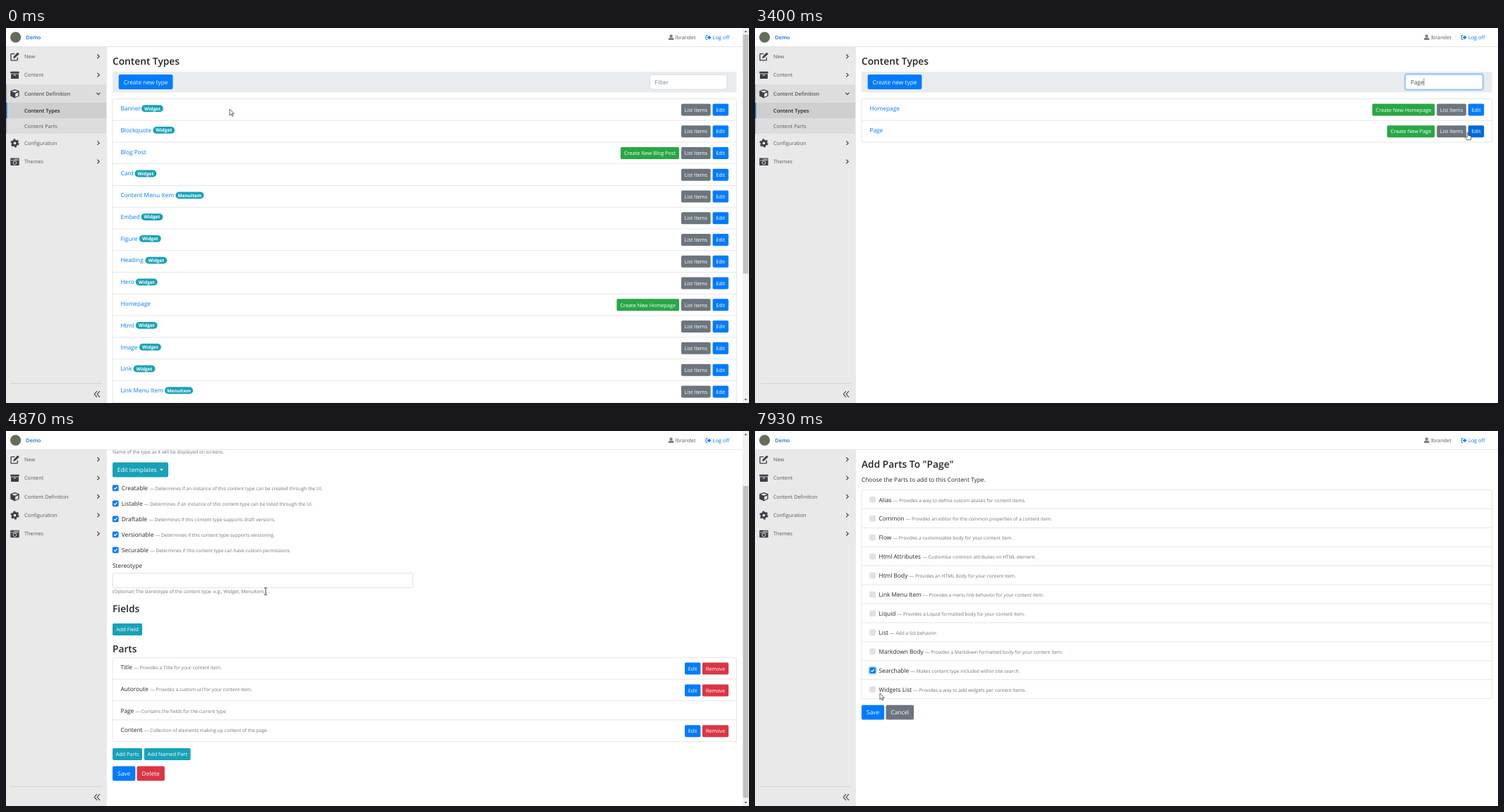
An HTML page that plays this animation: 1053 by 532 pixels, repeating every 8000 ms.

```html
<!DOCTYPE html>
<html lang="en">
<head>
<meta charset="utf-8">
<title>Content Types</title>
<style>
html, body { margin: 0; width: 100%; height: 100%; overflow: hidden; background: #fff; }
svg { display: block; width: 100vw; height: 100vh; }
text { font: 8.34px 'Open Sans', 'Noto Sans', sans-serif; fill: #212529; text-rendering: geometricPrecision; white-space: pre; }
.h { font-size: 13.75px; font-weight: 600; }
.s { font-size: 6.67px; fill: #6c757d; }
.m { font-size: 7.32px; fill: #555b61; }
.sm { font-size: 7.3px; }
.b { font-weight: 600; }
.badge { font-size: 6.5px; font-weight: 700; }
.url { font-size: 6.27px; fill: #5f6368; }
.link { fill: #007bff; }
.w { fill: #fff; text-anchor: middle; }
</style>
</head>
<body>
<svg id="stage" viewBox="0 0 1053 532"></svg>
<script>
const STEP = 200 / 3, LOOP = 8000, SHIFT = 9.3, SCROLL = 81.8;
const BLUE = '#007bff', GREY = '#6c757d', GREEN = '#28a745', TEAL = '#17a2b8', RED = '#dc3545';
const SIDE = '#e9e9e9', INK = '#3a4047';
const SITE = 'https://localhost:44358/demo/OrchardCore.ContentTypes/Admin/';

// name, badge x (0 = none), width of the create button (0 = none)
const TYPES = [
  ['Banner', 192], ['Blockquote', 208.3], ['Blog Post', 0, 83], ['Card', 182.5],
  ['Content Menu Item', 240.4], ['Embed', 191.5], ['Figure', 188.9], ['Heading', 197.4],
  ['Hero', 183.8], ['Homepage', 0, 88.5], ['Html', 183.8], ['Image', 189], ['Link', 180.6],
  ['Link Menu Item', 225], ['Page', 0, 67.5], ['Paragraph', 205.5, 0]
];
const OPTIONS = [
  ['Creatable', 'Determines if an instance of this content type can be created through the UI.'],
  ['Listable', 'Determines if an instance of this content type can be listed through the UI.'],
  ['Draftable', 'Determines if this content type supports draft versions.'],
  ['Versionable', 'Determines if this content type supports versioning.'],
  ['Securable', 'Determines if this content type can have custom permissions.']
];
const PARTS = [
  ['Title', 'Provides a Title for your content item.', 30.5],
  ['Autoroute', 'Provides a custom url for your content item.', 30.7],
  ['Page', 'Contains the fields for the current type', 27],
  ['Content', 'Collection of elements making up content of the page.', 30.7]
];
const CHOICES = [
  ['Alias', 'Provides a way to define custom aliases for content items.'],
  ['Common', 'Provides an editor for the common properties of a content item.'],
  ['Flow', 'Provides a customizable body for your content item.'],
  ['Html Attributes', 'Customise common attributes on HTML element.'],
  ['Html Body', 'Provides an HTML Body for your content item.'],
  ['Link Menu Item', 'Provides a menu link behavior for your content item.'],
  ['Liquid', 'Provides a Liquid formatted body for your content item.'],
  ['List', 'Add a list behavior.'],
  ['Markdown Body', 'Provides a Markdown formatted body for your content item.'],
  ['Searchable', 'Makes content type included within site search.'],
  ['Widgets List', 'Provides a way to add widgets per content items.']
];

// step, x, y, pointer shape from that step on
const PATH = [
  [0, 317, 115, 'arrow'], [1, 430, 150, 'arrow'], [2, 567, 180, 'arrow'], [4, 567, 180, 'arrow'],
  [6, 610, 170, 'arrow'], [9, 800, 122, 'arrow'], [13, 1014, 84, 'beam'], [16, 978, 77, 'beam'],
  [40, 978, 77, 'beam'], [42, 962, 90, 'arrow'], [45, 955, 115, 'arrow'], [49, 1000, 147, 'hand'],
  [52, 1015, 149, 'hand'], [57, 1015, 149, 'hand'], [58, 1000, 150, 'arrow'], [61, 640, 196, 'arrow'],
  [64, 368, 227.5, 'beam'], [73, 368, 227.5, 'beam'], [75, 345, 265, 'arrow'], [79, 240, 390, 'arrow'],
  [84, 174, 458, 'hand'], [93, 173, 457, 'arrow'], [94, 176, 450, 'arrow'], [97, 282, 257, 'beam'],
  [99, 296, 165, 'arrow'], [101, 290, 155, 'arrow'], [107, 163, 270, 'arrow'], [113, 166, 338, 'arrow'],
  [116, 166, 338, 'arrow'], [117, 166, 338, 'arrow'], [119, 177, 372, 'arrow']
];
const POINTERS = {
  arrow: '<path d="M0 0V8.9L2.1 7 3.5 10.2 4.9 9.6 3.5 6.5H6.2Z" fill="#fff" stroke="#222" stroke-width=".7"/>',
  beam: '<path d="M-2-4.8H-.6L0-4.3.6-4.8H2M0-4.3V4.3M-2 4.8H-.6L0 4.3.6 4.8H2" fill="none" stroke="#222" stroke-width=".9"/>',
  hand: '<path d="M-.8 0Q0-.9.8 0V4L4.4 4.9Q5.2 5.2 5 6.2L4.2 10.4H-1.2L-3.6 6.6Q-3.4 5.3-2.2 5.8L-.8 7Z" fill="#fff" stroke="#222" stroke-width=".7"/>'
};

const text = (x, y, str, cls = '', extra = '') => `<text x="${x}" y="${y}" class="${cls}" ${extra}>${str}</text>`;
const rect = (x, y, w, h, fill, r = 0, stroke = 'none', sw = .7) =>
  `<rect x="${x}" y="${y}" width="${w}" height="${h}" rx="${r}" fill="${fill}" stroke="${stroke}" stroke-width="${sw}"/>`;
const path = (d, fill, stroke = 'none', sw = 1) => `<path d="${d}" fill="${fill}" stroke="${stroke}" stroke-width="${sw}"/>`;
const move = (x, y, body) => `<g transform="translate(${x} ${y})">${body}</g>`;
const button = (x, cy, w, label, fill) =>
  rect(x, cy - 8.5, w, 17, fill, 1.8) + text(x + w / 2, cy + 2.7, label, 'sm w');
const bigButton = (x, y, w, label, fill) =>
  rect(x, y, w, 20.8, fill, 2.2) + text(x + w / 2, y + 13.5, label, 'w');
const described = (x, y, [name, info]) => text(x, y, `${name} <tspan class="s">— ${info}</tspan>`);
const input = (x, y, w, stroke = '#ced4da') => rect(x, y, w, 20.6, '#fff', 2.2, stroke);
const tick = (x, cy, on) => rect(x, cy - 4.4, 8.8, 8.8, on ? BLUE : '#dee2e6', 2) +
  (on ? path(`M${x + 2.2} ${cy + .1}L${x + 3.8} ${cy + 1.7} ${x + 6.7} ${cy - 1.6}`, 'none', '#fff', 1.2) : '');

function list(y, w, heights) {
  const total = heights.reduce((a, b) => a + b, 0);
  let at = y;
  const lines = heights.slice(0, -1).map(h => `M151 ${at += h}h${w}`).join('');
  return rect(151, y, w, total, '#fff', 2.2, '#dcdcdc') + path(lines, 'none', '#dcdcdc', .7);
}

const ICONS = {
  New: path('M10 7.5V11Q10 11.6 9.4 11.6H1.3Q.7 11.6.7 11V3Q.7 2.4 1.3 2.4H6', 'none', INK, 1.3) +
    path('M4 8.6L4.3 6.4 9.8.8Q10.3.4 10.8.8L12 1.9Q12.4 2.4 12 2.9L6.3 8.3Z', INK),
  Content: rect(0, 1.2, 12.4, 2.7, INK, .5) + rect(.7, 4.6, 11, 6.7, INK, .6) + rect(4.4, 5.7, 3.6, 1, SIDE),
  'Content Definition': path('M6.2 0L12.4 2.3V9.6L6.2 12.5 0 9.6V2.3Z', INK) +
    path('M6.2 1.5L10.5 3.1 6.2 4.8 1.9 3.1ZM6.9 6.2L11 4.5V8.9L6.9 10.9Z', SIDE),
  Configuration: `<g fill="none" stroke="${INK}"><circle cx="6.2" cy="6.2" r="3.3" stroke-width="2.8"/>
    <circle cx="6.2" cy="6.2" r="5.1" stroke-width="2" stroke-dasharray="2.8 2.54"/></g>`,
  Themes: rect(0, 1, 12.4, 10.6, INK, 1) + path('M5 2.6H11.4M.9 4.2H11.5', 'none', SIDE, .8) +
    `<circle cx="6.2" cy="7.7" r="2.4" fill="none" stroke="${SIDE}" stroke-width=".9"/>`
};

function sidebar(open) {
  let out = rect(0, 27, 142.4, 505, SIDE) + path('M142.4 27V532', 'none', '#dedede', .6);
  if (open) {
    out += rect(0, 80, 142, 70, '#dddddd') + rect(0, 106, 142, 22, '#cfcfcf') +
      rect(0, 80, 1.3, 70, '#b4b4b4') + rect(0, 106, 1.5, 22, '#0b78d0') +
      text(26, 119.7, 'Content Types', 'm b', 'style="fill:#212529"') + text(26, 141.7, 'Content Parts', 'm');
  }
  Object.keys(ICONS).forEach((name, i) => {
    const y = 40.3 + 26.35 * i + (open && i > 2 ? 43.8 : 0), down = open && i === 2;
    out += move(6.3, y - 6, ICONS[name]) + text(26, y + 2.5, name, down ? 'm b' : 'm') +
      path(down ? `M128.3 ${y - 1.2}l2.6 2.6 2.6-2.6` : `M129.4 ${y - 2.8}l2.8 2.8-2.8 2.8`, 'none', INK, 1.2);
  });
  return out + path('M6 504.5H136', 'none', '#cfcfcf', .8) +
    path('M129 515.2l-3.7 4.3 3.7 4.3M133 515.2l-3.7 4.3 3.7 4.3', 'none', INK, 1.1);
}

function header(dx) {
  const user = '<circle cx="942.6" cy="11.3" r="2.1" fill="#7b7f84"/>' + path('M938.9 17V15.8Q939 13.6 941 13.6H944.2Q946.2 13.6 946.3 15.8V17Z', '#7b7f84');
  const exit = path('M994.5 10.4H992.6Q992 10.4 992 11V15.7Q992 16.3 992.6 16.3H994.5', 'none', BLUE, 1) +
    path('M994 12.2H996V10.2L999.3 13.4 996 16.6V14.6H994Z', BLUE);
  return rect(0, 0, 1053, 26.5, '#fff') + path('M0 26.5H1053', 'none', '#dfdfdf', .8) +
    '<circle cx="13.6" cy="13.1" r="7.6" fill="#646c5c"/>' +
    text(28.3, 16, 'Demo', 'm b', 'style="fill:#0b74d1"') +
    move(dx, 0, user + text(948.6, 16.4, 'lbrandet', 'm') + exit + text(1001.6, 16.4, 'Log off', 'm', 'style="fill:#007bff"'));
}

const scrollbar = (y, h) => rect(1043.7, 0, 9.3, 532, '#f1f1f1') + rect(1044.6, y, 7.6, h, '#c1c1c1') +
  path('M1046.3 6L1048.4 3.4 1050.5 6ZM1046.3 526L1048.4 528.6 1050.5 526Z', '#666');

function typesPage(n) {
  const word = n < 25 ? '' : n < 28 ? 'P' : n < 31 ? 'Pa' : n < 33 ? 'Pag' : 'Page';
  const query = n < 26 ? '' : n < 29 ? 'p' : n < 32 ? 'pa' : 'pag';
  const rows = TYPES.filter(([name]) => name.toLowerCase().includes(query));
  const dx = query ? SHIFT : 0, width = 884.4 + dx, pitch = 30.77;
  const glow = n < 18 || n > 54 ? 0 : n === 18 ? .5 : 1;
  const caretX = 919.8 + [0, 5, 9.7, 14.2, 18.9][word.length];
  let out = text(151, 51.8, 'Content Types', 'h') + rect(151, 62, width, 29.3, '#e9ecef') +
    bigButton(159.7, 66.1, 76.7, 'Create new type', BLUE);
  out += move(dx, 0,
    (glow ? rect(911.6, 65.2, 111.2, 22.6, 'none', 3, `rgba(0,123,255,${.27 * glow})`, 2.2) : '') +
    input(912.6, 66.3, 109.3, glow ? '#80bdff' : '#ced4da') +
    text(919.6, 80, word || 'Filter', '', `style="fill:${word ? '#495057' : '#7a828a'}"`) +
    (n >= 17 && n < 54 ? path(`M${caretX} 71.5V82`, 'none', '#333', .6) : ''));
  out += list(100.4, width, rows.map(() => pitch));
  rows.forEach(([name, pill, create], i) => {
    const y = 114.2 + pitch * i, label = name.includes('Menu Item') ? 'MenuItem' : 'Widget';
    const pillW = label === 'Widget' ? 30.8 : 40;
    const hot = name === 'Page' && n > 50;
    out += text(162.4, y + 2.9, name, 'link');
    if (pill) out += rect(pill, y - 4.9, pillW, 9.8, TEAL, 4.9) + text(pill + pillW / 2, y + 2.4, label, 'badge w');
    out += move(dx, 0, (create ? button(954 - create, y + 1.7, create, 'Create New ' + name, GREEN) : '') +
      button(957, y + 1.7, 41.6, 'List Items', GREY) +
      (hot && n > 54 ? rect(1000.6, y - 7.8, 24.2, 19, 'none', 2.6, 'rgba(0,123,255,.45)', 2) : '') +
      button(1001.5, y + 1.7, 22.4, 'Edit', hot ? '#0069d9' : BLUE));
  });
  return out + sidebar(true) + header(dx) + (dx ? '' : scrollbar(9.4, 339));
}

function editPage(n) {
  const p = Math.min(1, Math.max(0, (n - 68) / 5)), top = SCROLL * p * p * (3 - 2 * p);
  let out = text(151, 51.8, 'Edit Content Type - Page', 'h') + text(151, 75.6, 'Display Name') +
    input(151.2, 83.8, 220.3) + text(158, 97.7, 'Page', '', 'style="fill:#495057"') +
    text(151, 114, 'Name of the type as it will be displayed on screens.', 's') +
    rect(151, 126.4, 79, 20.8, TEAL, 2.2) + text(157.8, 139.9, 'Edit templates', '', 'style="fill:#fff"') +
    path('M217.8 135.6h5.2l-2.6 2.7Z', '#fff');
  OPTIONS.forEach((option, i) => {
    const y = 162.6 + 22 * i;
    out += tick(150.8, y, true) + described(163.8, y + 3.2, option);
  });
  out += text(151, 275.6, 'Stereotype') + input(151.2, 283.5, 425.4) +
    text(151, 312.3, '(Optional) The stereotype of the content type. e.g., Widget, MenuItem, ...', 's') +
    text(151, 338.6, 'Fields', 'h') + button(151, 363.3, 42, 'Add Field', TEAL) +
    text(151, 395.6, 'Parts', 'h') + list(403.4, 884.4, PARTS.map(part => part[2]));
  let y = 417;
  for (const part of PARTS) {
    out += described(162.4, y + 3.1, part);
    if (part[0] !== 'Page') out += button(962, y + 1.9, 22.4, 'Edit', BLUE) + button(986.8, y + 1.9, 37.2, 'Remove', RED);
    y += part[0] === 'Page' ? 27 : 30.8;
  }
  out += button(151, 540.2, 42, 'Add Parts', n > 83 ? '#138496' : TEAL) + button(195.8, 540.2, 65.8, 'Add Named Part', TEAL) +
    bigButton(151, 557.3, 32.3, 'Save', BLUE) + bigButton(185.5, 557.3, 39.3, 'Delete', RED);
  return move(0, -top, out) + sidebar(false) + header(0) + scrollbar(9.4 + 68.4 * top / SCROLL, 442.5);
}

function addPage(n) {
  const pitch = 26.92;
  let out = text(151, 51.8, 'Add Parts To "Page"', 'h') +
    text(151, 71.6, 'Choose the Parts to add to this Content Type.') +
    list(83.5, 893.4, CHOICES.map(() => pitch));
  CHOICES.forEach((choice, i) => {
    const y = 97.3 + pitch * i, on = choice[0] === 'Searchable' && n > 113;
    if (on) out += rect(161.4, y - 5.3, 10.6, 10.6, 'none', 2.5, 'rgba(0,123,255,.3)', 1.4);
    out += tick(162.3, y, on) + described(175.5, y + 3.2, choice);
  });
  return out + bigButton(151, 388.8, 32.2, 'Save', BLUE) + bigButton(185.5, 388.8, 39.6, 'Cancel', GREY) +
    sidebar(false) + header(SHIFT);
}

function status(n) {
  const page = n >= 54 && n < 64 ? 'Edit/Page' : n >= 85 && n < 95 ? 'AddPartsTo/Page' : '';
  if (!page) return '';
  const w = page === 'Edit/Page' ? 221.3 : 242;
  return rect(-2, 521.6, w + 2, 12, '#dee1e6', 2, '#c4c7cc', .5) + text(1.6, 529, SITE + page, 'url');
}

function pointer(n) {
  const i = PATH.findLastIndex(key => key[0] <= n);
  const [n0, x0, y0, shape] = PATH[i], [n1, x1, y1] = PATH[i + 1] || PATH[i];
  const k = n1 > n0 ? (n - n0) / (n1 - n0) : 0;
  return move(x0 + (x1 - x0) * k, y0 + (y1 - y0) * k, POINTERS[shape]);
}

const stage = document.getElementById('stage');
let shown = -1;
function draw() {
  const n = Math.min(119, Math.floor((performance.now() % LOOP) / STEP + .1));
  if (n !== shown) {
    shown = n;
    const page = n < 58 ? typesPage : n < 93 ? editPage : addPage;
    stage.innerHTML = page(n) + status(n) + pointer(n);
  }
  requestAnimationFrame(draw);
}
draw();
</script>
</body>
</html>
```
